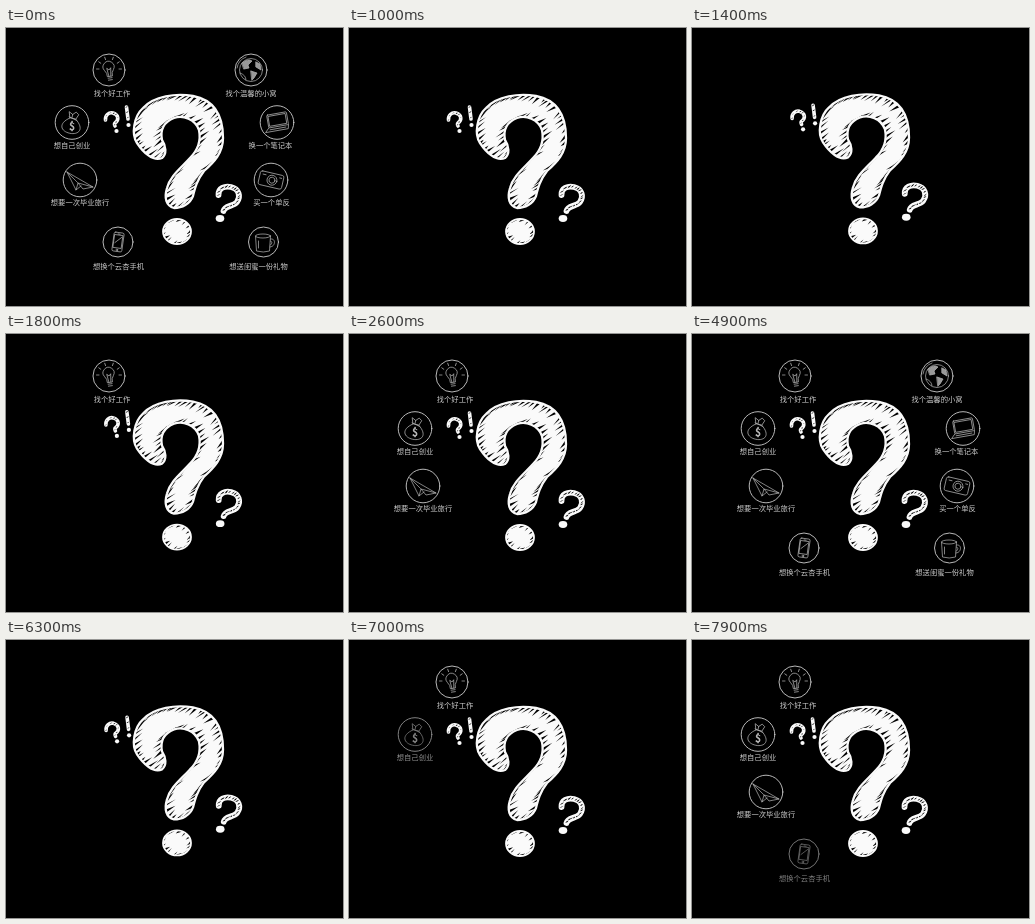
An HTML page for the animation above (8000 ms loop, 337 px wide and 278 px high).

```html
<!DOCTYPE html>
<html lang="zh">
<head>
<meta charset="utf-8">
<style>
  html, body { margin: 0; width: 100%; height: 100%; overflow: hidden; background: #000; }
  svg { display: block; width: 100vw; height: 100vh; }
  text { font: 300 7.3px "Noto Sans CJK SC", "Noto Sans CJK", sans-serif; fill: #ccc; text-anchor: middle; }
  .line { fill: none; stroke: #b8b8b8; stroke-width: .7; stroke-linecap: round; stroke-linejoin: round; }
  .ring { stroke: #ccc; stroke-width: .9; }
  .chalk { fill: none; stroke: #fafafa; stroke-linecap: round; stroke-linejoin: round; }
  .white { fill: #fafafa; }
</style>
</head>
<body>
<svg viewBox="0 0 337 278">
  <g id="big">
    <path id="hook" class="white" d="M131 115C125 106 128 88 137 80C148 68 170 65 187 68C208 72 217 88 217 110
      C217 125 208 134 198 143C191 152 189 160 187 168C184 176 176 180 168 180C160 178 158 170 161 160
      C164 148 175 140 184 130C192 122 195 112 193 102C189 91 177 87 168 90C158 94 154 102 156 112
      C160 118 161 126 156 130C147 134 137 124 131 115Z"/>
    <ellipse id="dot" class="white" cx="171" cy="203.5" rx="14" ry="12.5"/>
  </g>
  <g id="left">
    <path id="leftHook" class="chalk" stroke-width="3.6" d="M99.5 92C99 87 103 84 107 85C113 87 113 92 109 95Q108 96 109 98"/>
    <circle class="white" cx="110.5" cy="103" r="2.1"/>
    <path id="bang" class="chalk" stroke-width="3.6" d="M120.5 79L122 91"/>
    <circle class="white" cx="122.5" cy="97" r="2.1"/>
  </g>
  <g id="right">
    <path id="rightHook" class="chalk" stroke-width="5.8" d="M212.5 167C212 160 219 157.5 225 159C233 161 235 168 231 174C227 179 219 177 217.5 183"/>
    <ellipse class="white" cx="214" cy="190.5" rx="4.3" ry="3.4"/>
  </g>
  <g id="wishes"></g>
</svg>
<script>
const $ = id => document.getElementById(id);
let seed = 7;
const rand = (lo, hi) => lo + (hi - lo) * (seed = seed * 16807 % 2147483647) / 2147483647;

// Scatter slanted dark slivers along a shape, then redraw its rim if it has one.
function hatch(id, step, reach, width, rim) {
  const shape = $(id);
  let slivers = '';
  for (let d = 0; d < shape.getTotalLength(); d += step * rand(.6, 1.4)) {
    const p = shape.getPointAtLength(d), r = reach * rand(.5, 1.2), w = width * rand(.4, 1);
    slivers += `<path transform="translate(${p.x} ${p.y}) rotate(${rand(-48, -26)})" d="M${-r} 0L0 ${-w} ${r} 0 0 ${w}z"/>`;
  }
  if (rim) slivers += `<use href="#${id}" class="chalk" stroke-width="${rim}" style="fill:none"/>`;
  shape.insertAdjacentHTML('afterend', `<g>${slivers}</g>`);
  if (rim) {
    const outline = shape.cloneNode();
    outline.removeAttribute('id');
    outline.setAttribute('class', 'chalk');
    outline.setAttribute('stroke-width', rim);
    shape.nextSibling.lastChild.replaceWith(outline);
  }
}
hatch('hook', 5, 10, 1.5, 2.3);
hatch('dot', 5, 5, 1.4, 1.8);
hatch('leftHook', 4, 1.6, .5);
hatch('bang', 4, 1.6, .5);
hatch('rightHook', 3, 2.4, .7);

const turn = (angle, art) => `<g transform="rotate(${angle})">${art}</g>`;
const rays = [-90, -55, -20, 20, 55, 90].map(a => turn(a, '<path d="M0-10V-12.5"/>')).join('');

const bulb = turn(-8, `<path d="M-2.500 6Q-2 3-4.500 0A5.500 5.500 0 1 1 4.500 0Q2 3 2.500 6zM-2 8H2M-2 10H2M-1 6L-2-2 0 0 2-2 1 6"/>`)
  + `<g transform="translate(0 -1)">${rays}</g>`;
const bag = turn(12, `<path d="M-3-4C-14 4-9 11 0 11S14 4 3-4zM-3-4L-5-10-1-8 2-11 5-9 3-4M-4-5L4-3M-1-5V-8"/>`)
  + `<text y="7" font-size="9" style="font-size:10px">$</text>`;
const plane = `<path d="M-13-8L13 7 3 9-2 3zM-13-8L-4 10-2 3 13 7M-4 10L1 6"/>`;
const phone = turn(8, `<rect x="-5" y="-9.500" width="10" height="19" rx="1.500"/><path d="M-4-7H4V6H-4zM-1-8H1M-3 1L3-5"/><circle cy="8" r=".8"/>`);
const mug = `<path d="M-8-6L-7 9Q0 11 6 9L7-6M7-3C13-4 12 5 6.500 5M7-1Q10 0 7 3M-5-1V6"/><ellipse cx="-.5" cy="-6" rx="7.500" ry="2"/>`;
const camera = turn(13, `<rect x="-12" y="-7" width="24" height="14" rx="2"/><circle cx="1" r="5"/><circle cx="1" r="3"/><path d="M-9-4H-6M8-4H10"/>`);
const laptop = turn(-10, `<rect x="-9" y="-9" width="20" height="13" rx="1"/><rect x="-7.500" y="-7.500" width="17" height="10"/><path d="M-9 4L-13 8H10L11 4M-8 6H8"/>`);
const globe = `<circle r="11.500"/><path fill="#999" d="M-9-7Q-3-12 1-9L-3-5-2-2-7-1zM0 1L6 3 3 8 1 10zM5-8L9-6 10 0 5-3z"/>
  <path d="M-11 3Q-5 5-5 10M-14-2A14 14 0 0 1-5-13"/>`;

// Left side runs downwards, right side back up; each row shares height and ring size.
const rows = [[42, 16.5], [94.5, 17.3], [152, 17.3], [214, 15.5]];
const wishes = [
  // icon x, label x, label, drawing
  [103, 106, '找个好工作', bulb],
  [66, 66, '想自己创业', bag],
  [74, 74, '想要一次毕业旅行', plane],
  [112, 112.5, '想换个云杏手机', phone],
  [257.5, 252.5, '想送闺蜜一份礼物', mug],
  [265, 265.5, '买一个单反', camera],
  [271, 264.5, '换一个笔记本', laptop],
  [245, 245, '找个温馨的小窝', globe]
];
$('wishes').innerHTML = wishes.map(([x, labelX, label, art], i) => {
  const [y, r] = rows[Math.min(i, 7 - i)];
  return `<g><g class="line" transform="translate(${x} ${y})"><circle class="ring" r="${r - .5}"/><g stroke-width=".7">${art}</g></g>
    <text x="${labelX}" y="${y + 15.5 - r + 27}">${label}</text></g>`;
}).join('');
const groups = [...$('wishes').children];

const LOOP = 8000, STEP = 100, CLEAR = 1000, RESTART = 6300, ROUND = 4900;
const FIRST = 1460, SPACING = 455, FADE = 220;
const clamp = x => Math.max(0, Math.min(1, x));

function draw(now) {
  const t = Math.floor(now % LOOP / STEP) * STEP;
  const u = t < RESTART ? t : t - ROUND;
  groups.forEach((g, i) => {
    const shown = clamp((u - FIRST - SPACING * i) / FADE) ** 2;
    g.setAttribute('opacity', t < CLEAR ? 1 : shown);
  });

  // The question marks bob once at the start of each round.
  const lift = Math.sin(clamp((u - 1150) / 800) * Math.PI);
  const move = (id, dx, dy) => $(id).setAttribute('transform', `translate(${dx * lift} ${dy * lift})`);
  move('big', 0, -.7);
  move('left', .7, -2);
  move('right', .3, -1.5);
}

const origin = performance.now();
(function tick() {
  draw(performance.now() - origin);
  requestAnimationFrame(tick);
})();
</script>
</body>
</html>
```
